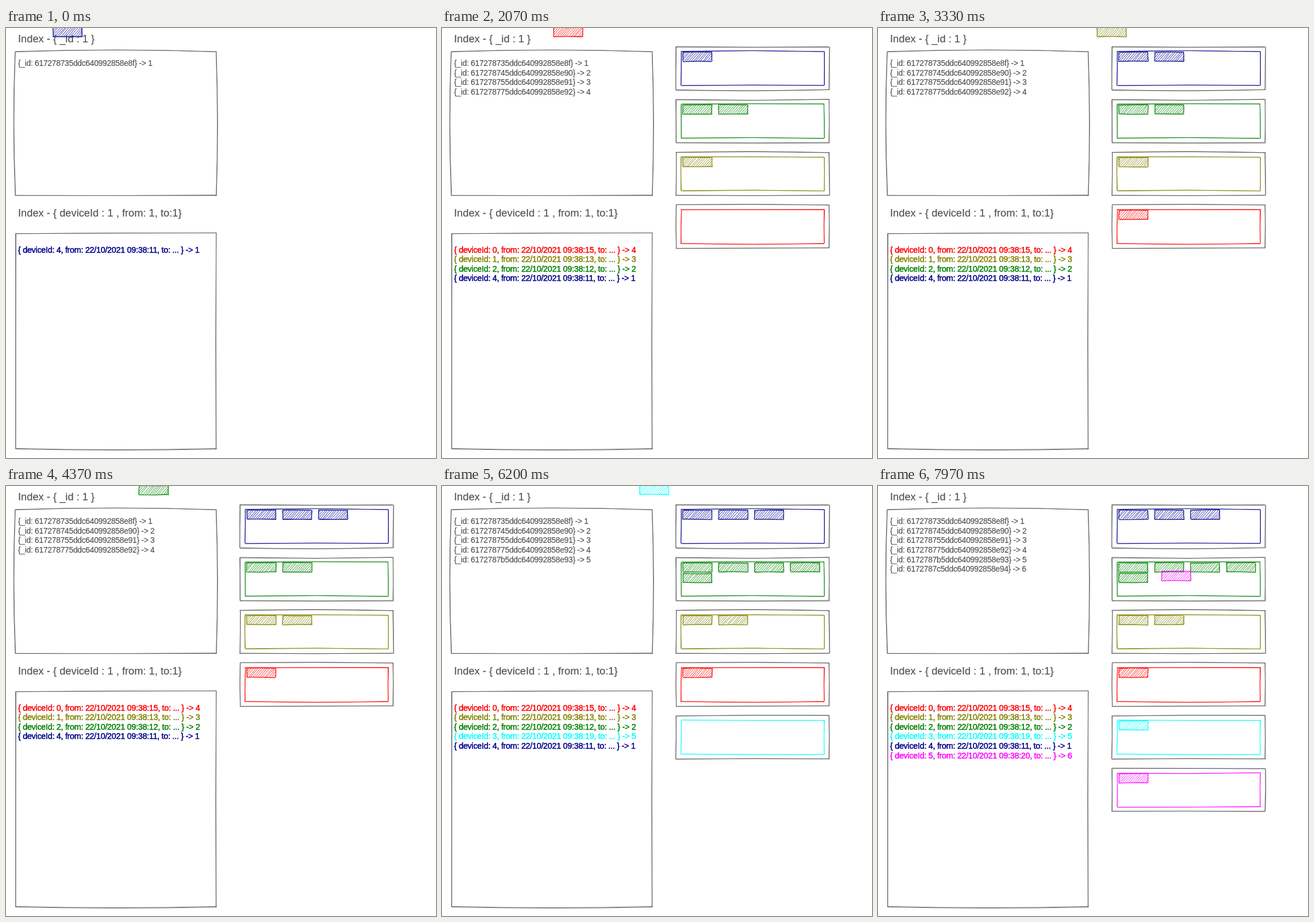
Write an HTML page with a canvas that moves like this. It is 748x748 px and loops after 8 s.

```html
<!DOCTYPE html>
<html lang="en">
<head>
<meta charset="utf-8">
<title>Bucketed index</title>
<style>
  html, body { margin: 0; width: 100%; height: 100%; overflow: hidden; background: #fff; }
  canvas { display: block; }
</style>
</head>
<body>
<canvas id="stage" width="748" height="748"></canvas>
<script>
const ctx = document.getElementById('stage').getContext('2d');
const LOOP = 8000, FRAMES = 240, FPS = 30;
const STEP = 37.4, FIRST_COLUMN = 3, PITCH = 91.65;
const GRAY = '#555';

// Buckets in order of creation
const devices = [
  { id: 4, color: '#00008b', oid: '735ddc640992858e8f', second: 11 },
  { id: 2, color: '#008000', oid: '745ddc640992858e90', second: 12 },
  { id: 1, color: '#808000', oid: '755ddc640992858e91', second: 13 },
  { id: 0, color: '#ff0000', oid: '775ddc640992858e92', second: 15 },
  { id: 3, color: '#00ffff', oid: '7b5ddc640992858e93', second: 19 },
  { id: 5, color: '#ff00ff', oid: '7c5ddc640992858e94', second: 20 }
];
const arrivals = [0, 1, 2, 1, 3, 0, 2, 0, 1, 1, 1, 4, 5, 5];

// A tile steps right, then down, rests one frame and snaps into its slot.
const filled = devices.map(() => 0);
let start = 1;
const tiles = arrivals.map((bucket, index) => {
  const slot = filled[bucket]++;
  const x = 419 + 62.4 * (slot % 4);
  const y = 42 + PITCH * bucket + 18.4 * Math.floor(slot / 4);
  const column = Math.ceil((x - 8.2) / STEP);
  const row = Math.ceil(y / STEP);
  const tile = { bucket, index, x, y, column, row, start };
  start += column - FIRST_COLUMN + row + 2;
  return tile;
});

function random(seed) {
  let s = seed * 7919 + 17;
  const next = range => {
    s = (s * 16807 + 11) % 2147483647;
    return (s / 2147483647 * 2 - 1) * range;
  };
  for (let i = 0; i < 5; i++) next(1);
  return next;
}

// Hand-drawn rectangle; bows push the sides outwards: top, right, bottom, left
function sketch(x, y, w, h, color, seed, bows, wobble = .8) {
  const rnd = random(seed);
  bows = bows || [w, h, w, h].map(length => rnd(Math.min(1.5, length * .01)));
  const corners = [[x, y], [x + w, y], [x + w, y + h], [x, y + h]];
  ctx.strokeStyle = color;
  ctx.lineWidth = .8;
  ctx.beginPath();
  for (let pass = 0; pass < 2; pass++) {
    corners.forEach(([x1, y1], i) => {
      const [x2, y2] = corners[(i + 1) % 4];
      const length = Math.hypot(x2 - x1, y2 - y1);
      const bow = 2 * bows[i] + rnd(wobble);
      ctx.moveTo(x1 + rnd(wobble), y1 + rnd(wobble));
      ctx.quadraticCurveTo(
        (x1 + x2) / 2 + (y2 - y1) / length * bow,
        (y1 + y2) / 2 - (x2 - x1) / length * bow,
        x2 + rnd(wobble), y2 + rnd(wobble));
    });
  }
  ctx.stroke();
}

function drawTile(x, y, color, seed) {
  const w = 50.5, h = 16, slant = 14, rnd = random(seed);
  ctx.strokeStyle = color;
  ctx.lineWidth = .5;
  ctx.beginPath();
  for (let foot = 4 - slant; foot < w; foot += 4) {
    const from = Math.max(0, -foot / slant);
    const to = Math.min(1, (w - foot) / slant);
    for (let pass = 0; pass < 2; pass++) {
      ctx.moveTo(x + foot + slant * from + rnd(1), y + h * (1 - from) + rnd(.8));
      ctx.lineTo(x + foot + slant * to + rnd(1), y + h * (1 - to) + rnd(.8));
    }
  }
  ctx.stroke();
  sketch(x, y, w, h, color, seed + 1);
}

function write(text, y, size, color, weight = 0) {
  ctx.font = `${size}px "Liberation Sans", Arial, sans-serif`;
  ctx.letterSpacing = size < 16 ? '-0.28px' : '0px';
  ctx.fillStyle = ctx.strokeStyle = color;
  ctx.fillText(text, 21, y);
  if (weight) {
    ctx.lineWidth = weight;
    ctx.strokeText(text, 21, y);
  }
}

function drawBucket(index) {
  const top = PITCH * index;
  sketch(407, 33 + top, 266.5, 75, GRAY, index * 2 + 3);
  sketch(416, 41 + top, 249, 59, devices[index].color, index * 2 + 40);
}

function drawIndexes(known) {
  write('Index - { _id : 1 }', 24.5, 18.3, GRAY, .2);
  sketch(16, 41.5, 350, 249.5, GRAY, 1, [3, 2, .5, 2.5]);
  known.forEach((d, i) =>
    write(`{_id: 617278${d.oid}} -> ${i + 1}`, 66 + 16.65 * i, 13.85, GRAY, .2));

  write('Index - { deviceId : 1 , from: 1, to:1}', 328, 18.3, GRAY, .2);
  sketch(17, 357, 349, 375, GRAY, 2, [.3, -.8, 2, .3]);
  [...known].sort((a, b) => a.id - b.id).forEach((d, i) => {
    const key = `{ deviceId: ${d.id}, from: 22/10/2021 09:38:${d.second}, to: ... }`;
    write(`${key} -> ${known.indexOf(d) + 1}`, 390.5 + 16.65 * i, 14.35, d.color, .5);
  });
}

function draw(frame) {
  ctx.clearRect(0, 0, 748, 748);
  const current = Math.max(0, tiles.findLastIndex(tile => tile.start <= frame));
  const moving = tiles[current];
  const seen = Math.max(...arrivals.slice(0, current + 1)) + 1;
  drawIndexes(devices.slice(0, seen));

  // A new bucket opens one step after its first tile appears.
  const opened = tiles.filter(tile => tile.start < frame).map(tile => tile.bucket);
  new Set(opened).forEach(drawBucket);

  for (const tile of tiles.slice(0, current))
    drawTile(tile.x, tile.y, devices[tile.bucket].color, 100 + tile.index * 31 + current * 7);

  const steps = FIRST_COLUMN + frame - moving.start;
  const column = Math.min(steps, moving.column);
  const row = Math.min(steps - column, moving.row);
  drawTile(7.2 + STEP * column, -1 + STEP * row,
    devices[moving.bucket].color, 900 + current * 40 + column + row);
}

function tick() {
  const time = performance.now() % LOOP;
  draw(Math.min(FRAMES - 1, Math.floor(time * FPS / 1000 + .12)));
  requestAnimationFrame(tick);
}
tick();
</script>
</body>
</html>
```
